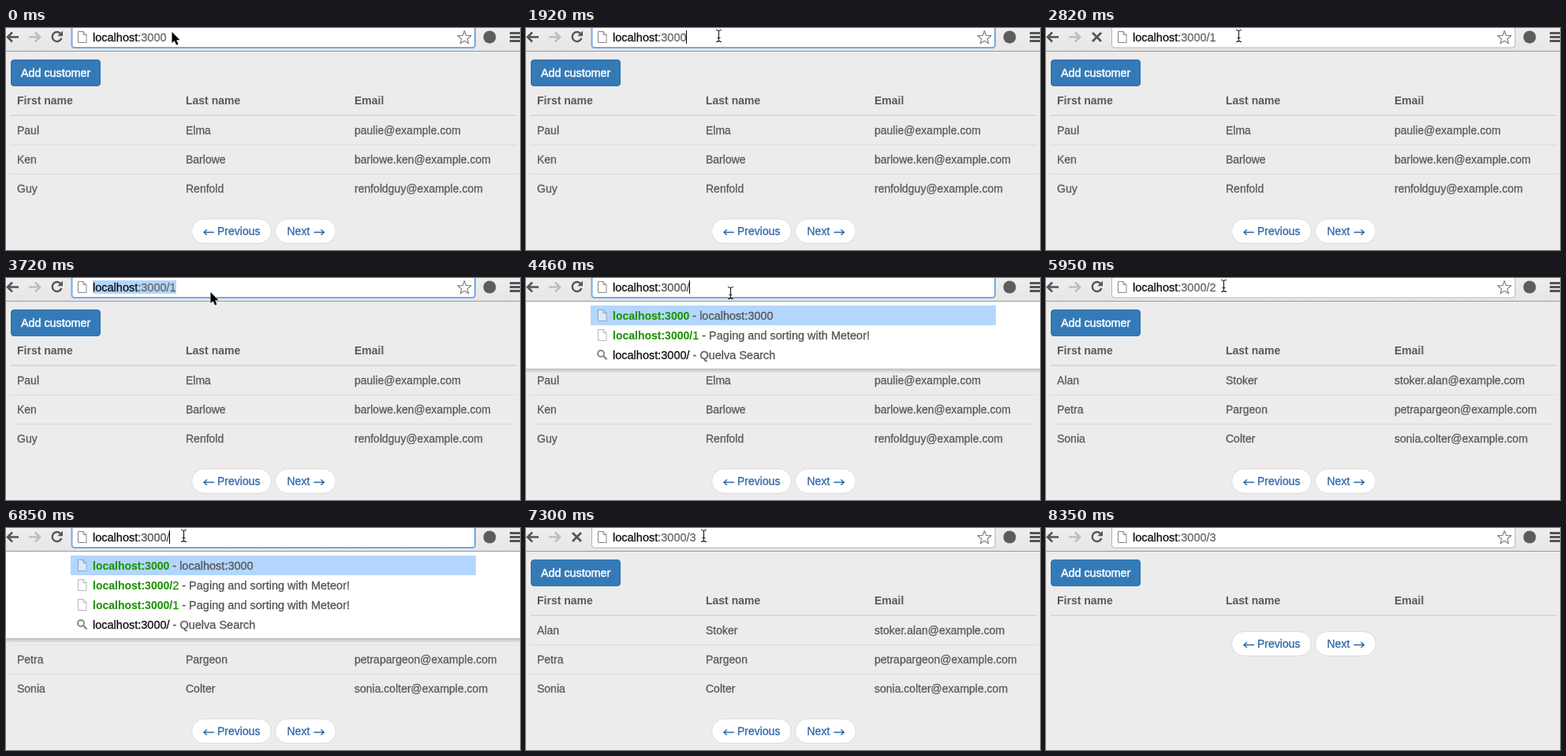
Write an HTML page that moves like this. It is 652 px wide and 282 px high and loops after 8.66 s.

```html
<!DOCTYPE html>
<html lang="en">
<head>
<meta charset="utf-8">
<title>Customer paging</title>
<style>
  html, body { margin: 0; width: 100%; height: 100%; overflow: hidden; background: #ececec; }
  svg { display: block; width: 652px; height: 282px; }
  text { font: 14px "Liberation Sans", Arial, sans-serif; color: #5a5a5a; white-space: pre; }
  text, tspan { fill: currentColor; stroke: currentColor; stroke-width: .3px; }
  .bold { font-weight: bold; stroke-width: 0; }
  .bar { font-size: 14.5px; color: #111; }
  .soft { color: #666; }
  .title { color: #555; }
  .match { font-size: 14px; font-weight: bold; color: #1e9400; stroke-width: .1px; }
  .green { color: #1e9400; }
  .link { color: #2c66ab; }
  .button { font-size: 14.3px; color: #fff; stroke-width: .5px; }
</style>
</head>
<body>
<svg id="stage" viewBox="0 0 652 282"></svg>
<script>
const LOOP = 8660;
const HOST = "localhost:3000";
const COLUMNS = [14, 228, 442];
const CARET_X = [203, 207, 215];

const PAGES = [
  [],
  [["Paul", "Elma", "paulie@example.com"],
   ["Ken", "Barlowe", "barlowe.ken@example.com"],
   ["Guy", "Renfold", "renfoldguy@example.com"]],
  [["Alan", "Stoker", "stoker.alan@example.com"],
   ["Petra", "Pargeon", "petrapargeon@example.com"],
   ["Sonia", "Colter", "sonia.colter@example.com"]]
];

const START = {
  path: "", page: 1, focus: true, caret: false, selected: false,
  loading: false, menu: null, hover: false, cursor: ["arrow", 210, 5]
};
const select = (x, y) => ({ focus: true, selected: true, cursor: ["arrow", x, y] });
const click = (x, y) => ({ selected: false, caret: true, cursor: ["beam", x, y] });
const type = (path, ...menu) => ({ path, menu });
const submit = { menu: null, focus: false, caret: false, loading: true };

// Each step lists only what changes at that time.
const STEPS = [
  [0, {}],
  [140, { caret: true }],
  [590, submit],
  [1040, { loading: false }],
  [1190, { cursor: ["beam", 219, 7] }],
  [1340, { cursor: ["beam", 232, 8] }],
  [1480, { cursor: ["beam", 244, 9] }],
  [1630, select(244, 9)],
  [1920, click(244, 9)],
  [2370, type("/", "")],
  [2520, type("/1", "/1")],
  [2820, submit],
  [3120, { page: 0 }],
  [3270, { page: 1, loading: false }],
  [3420, { cursor: ["beam", 250, 13] }],
  [3570, { cursor: ["beam", 259, 18] }],
  [3720, select(259, 18)],
  [4170, click(259, 18)],
  [4460, type("/", "", "/1")],
  [4610, type("/2", "/2")],
  [4900, submit],
  [5200, { page: 0 }],
  [5350, { page: 2, loading: false }],
  [5650, { cursor: ["beam", 250, 16] }],
  [5800, { cursor: ["beam", 236, 12] }],
  [5950, { cursor: ["beam", 225, 9] }],
  [6100, select(225, 9)],
  [6400, click(225, 9)],
  [6850, type("/", "", "/2", "/1")],
  [7000, type("/3", "/3")],
  [7300, submit],
  [7450, { cursor: ["beam", 226, 16] }],
  [7600, { page: 0, loading: false, cursor: ["arrow", 236, 80] }],
  [7750, { hover: true, cursor: ["arrow", 258, 140] }],
  [7900, { cursor: ["arrow", 300, 152] }],
  [8050, { hover: false, cursor: ["arrow", 390, 190] }],
  [8200, { cursor: ["arrow", 590, 264] }],
  [8350, { cursor: null }]
];

let last = START;
const STATES = STEPS.map(([at, change]) => [at, last = { ...last, ...change }]);

const text = (x, y, body, cls = "") => `<text x="${x}" y="${y}" class="${cls}">${body}</text>`;
const span = (cls, body) => `<tspan class="${cls}">${body}</tspan>`;
const rect = (x, y, w, h, fill, more = "") =>
  `<rect x="${x}" y="${y}" width="${w}" height="${h}" fill="${fill}" ${more}/>`;
const line = (d, color, width) =>
  `<path d="${d}" fill="none" stroke="${color}" stroke-width="${width}"/>`;

const sheet = (y, color) =>
  `<path d="M91.5 ${y}h6.5l4 4v10h-10.5zM98 ${y}v4h4" fill="#fff" fill-opacity=".5" stroke="${color}"/>`;

function star(cx, cy) {
  const points = Array.from({ length: 10 }, (_, i) => {
    const r = i % 2 ? 3.8 : 9, a = Math.PI * (i / 5 - .5);
    return `${cx + r * Math.cos(a)},${cy + r * Math.sin(a)}`;
  });
  return `<polygon points="${points.join(" ")}" fill="#fff" stroke="#858585" stroke-width="1.2" stroke-linejoin="round"/>`;
}

function pager(y, hover) {
  const pill = (x, w, fill) => rect(x, y + .5, w, 31, fill, 'rx="15.5" stroke="#dcdcdc"');
  // The arrow glyphs are drawn, as they differ most between fonts.
  const arrow = (x, dir) =>
    line(`M${x} ${y + 17.5}h${13 * dir}M${x + 4 * dir} ${y + 14}l${-4 * dir} 3.5l${4 * dir} 3.5`, "#2c66ab", 1.4);
  return pill(235.5, 101, hover ? "#eee" : "#fff") + pill(341.5, 77, "#fff") +
    arrow(251, 1) + text(268, y + 21, "Previous", "link") +
    text(356.5, y + 21, "Next", "link") + arrow(403.5, -1);
}

function page(s) {
  const rows = PAGES[s.page];
  const cells = (row, y, cls) => row.map((cell, i) => text(COLUMNS[i], y, cell, cls)).join("");
  return rect(6.5, 40.5, 113, 33, "#337ab7", 'rx="3.5" stroke="#2e6da4"') +
    text(19, 62, "Add customer", "button") +
    cells(["First name", "Last name", "Email"], 97, "bold") +
    rect(6, 110, 642, 2, "#d9d9d9") +
    rows.map((row, i) =>
      (i ? rect(6, 111 + 37 * i, 642, 1, "#dcdcdc") : "") + cells(row, 135 + 37 * i)).join("") +
    pager(rows.length ? 242 : 131, s.hover);
}

function toolbar(s) {
  const reload = line("M69.3 7.2A6 6 0 1 0 70.4 13", "#555", 2.4) +
    '<path d="M72 3.5V10.2H65.3Z" fill="#555"/>';
  const stop = line("M59 6L70 17M70 6L59 17", "#555", 2.8);
  const border = s.focus ? 'stroke="#74a9e6" stroke-width="2"' : 'stroke="#b4b4b4"';
  return rect(0, 0, 652, 29, "url(#chrome)") + rect(0, 29, 652, 1, "#999") +
    line("M16 11.5H2M8 5.5L2 11.5L8 17.5", "#555", 2.6) +
    line("M29 11.5H43M37 5.5L43 11.5L37 17.5", "#bdbdbd", 2.6) +
    (s.loading ? stop : reload) +
    rect(83.5, -6, 511.5, 31, "#fff", `rx="3.5" ${border}`) +
    sheet(4.5, "#858585") +
    (s.selected ? rect(110, 3, CARET_X[s.path.length] + 1 - 110, 17, "#b2d5fd") : "") +
    text(110, 17, "localhost" + span(s.menu ? "title" : "soft", ":3000" + s.path), "bar") +
    (s.caret ? rect(CARET_X[s.path.length], 3, 1, 17, "#000") : "") +
    (s.menu ? "" : star(581.5, 12.5)) +
    '<circle cx="613.5" cy="11.5" r="8" fill="#5c5c5c"/>' +
    line("M639 6.5H652M639 11.5H652M639 16.5H652", "#555", 2.8);
}

function menu(s) {
  if (!s.menu) return "";
  const bottom = 65 + 25 * s.menu.length;
  const entry = (path, i) => {
    const typed = path.slice(0, s.path.length);
    const title = !path ? " - " + HOST : path === s.path ? "" : " - Paging and sorting with Meteor!";
    return sheet(40.5 + 25 * i, i ? "#b5b5b5" : "#8fa5bd") + text(110, 53 + 25 * i,
      span("match", HOST + typed) + span("green", path.slice(typed.length)) + span("title", title), "bar");
  };
  const y = bottom - 18;
  return rect(0, bottom, 652, 6, "url(#shade)") +
    rect(0, 30, 652, bottom - 30, "#fff") +
    rect(82, 35, 514, 25, "#b2d6fd") + s.menu.map(entry).join("") +
    `<circle cx="95" cy="${y - 1}" r="4" fill="none" stroke="#888" stroke-width="2"/>` +
    line(`M98 ${y + 2}L102.5 ${y + 6.5}`, "#888", 2.4) +
    text(110, bottom - 12, HOST + s.path + span("title", " - Quelva Search"), "bar");
}

function pointer(cursor) {
  if (!cursor) return "";
  const [kind, x, y] = cursor;
  const shape = kind === "arrow"
    ? '<path d="M.5 0V14L3.7 11.2L6 16.5L8.5 15.4L6.2 10.2H10.5Z" stroke="#fff" stroke-width="1" paint-order="stroke"/>'
    : line("M-3 -6.5Q0 -6.5 .5 -5Q1 -6.5 4 -6.5M.5 -5V7M-3 8.5Q0 8.5 .5 7Q1 8.5 4 8.5M-1.5 3.5H2.5", "#222", 1.2);
  return `<g transform="translate(${x} ${y})">${shape}</g>`;
}

const gradient = (id, from, to) =>
  `<linearGradient id="${id}" x2="0" y2="1"><stop stop-color="${from}"/><stop offset="1" stop-color="${to}"/></linearGradient>`;
const DEFS = `<defs>${gradient("chrome", "#eeeeee", "#e6e6e6")}${gradient("shade", "#0003", "#0000")}</defs>`;

const stage = document.getElementById("stage");
const start = performance.now();
let shown;

function frame() {
  const t = (performance.now() - start) % LOOP;
  const state = STATES.findLast(([at]) => at <= t)[1];
  if (state !== shown) {
    shown = state;
    stage.innerHTML = DEFS + rect(0, 0, 652, 282, "#ececec") +
      page(state) + toolbar(state) + menu(state) + pointer(state.cursor);
  }
  requestAnimationFrame(frame);
}
frame();
</script>
</body>
</html>
```
